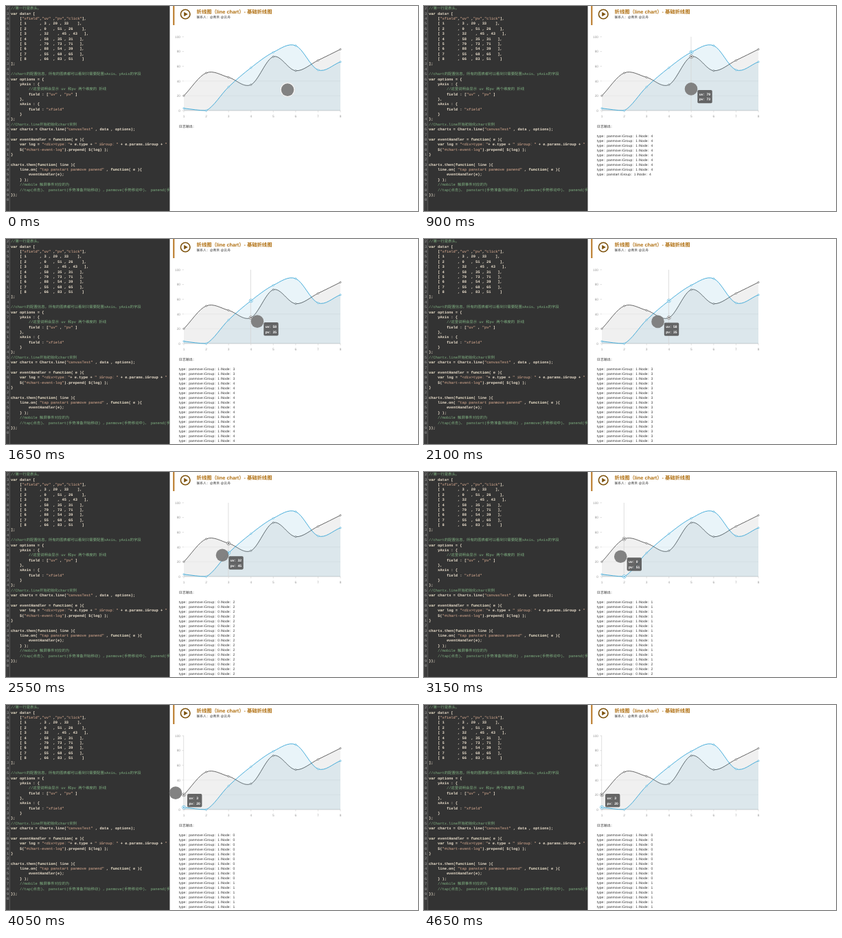
These frames come from a looping animation (600x300 px, 5930 ms). An HTML page:

```html
<!DOCTYPE html>
<html lang="zh">
<head>
<meta charset="utf-8">
<title>折线图</title>
<style>
html, body { margin: 0; width: 100%; height: 100%; overflow: hidden; background: #fff; }
svg { display: block; width: 600px; height: 300px; }
text { font: 5px "Liberation Sans", "Noto Sans CJK SC", "Noto Sans CJK", sans-serif; fill: #333; text-rendering: geometricPrecision; }
.code text { font: bold 5.4px "Liberation Mono", "Noto Sans CJK SC", "Noto Sans CJK", monospace; fill: #efe3d0; }
.code .comment { fill: #80b383; font-weight: normal; }
.code .string { fill: #e6b598; font-weight: normal; }
.code .keyword { fill: #fbf0d6; }
.code .lineno { fill: #aaa; font-weight: normal; }
.title { font-size: 7.3px; font-weight: bold; fill: #b06f10; }
.axis text { font-size: 4.8px; fill: #999; }
.tip text { font-weight: bold; fill: #fff; }
</style>
</head>
<body>
<svg viewBox="0 0 600 300">
  <defs><clipPath id="pane"><rect width="238.5" height="300"/></clipPath></defs>
  <g class="code" clip-path="url(#pane)">
    <rect width="239" height="300" fill="#333"/>
    <rect width="5.5" height="300" fill="#3d3d3d"/>
    <path d="M5.5 0V300" stroke="#666" stroke-width=".7"/>
    <g id="code"></g>
  </g>
  <rect x="243.3" width="2" height="28" fill="#b5731f"/>
  <circle cx="261.2" cy="12" r="6.8" fill="none" stroke="#7d520c" stroke-width="1.6"/>
  <path d="M259.2 8.8L264.8 12L259.2 15.2Z" fill="#7d520c"/>
  <text class="title" x="277.6" y="10.7">折线图（line chart）- 基础折线图</text>
  <text x="277.5" y="18.4" style="font-size:4.8px">联系人：@青禾 @云舟</text>
  <g class="axis" id="axis"></g>
  <g id="chart"></g>
  <text x="251.8" y="177.7">日志输出：</text>
  <g id="log"></g>
  <g id="hover">
    <path id="cross" stroke="#d6d6d6" stroke-width=".8"/>
    <g id="marks"></g>
    <g class="tip" id="tip">
      <rect width="21.4" height="19.4" rx="1.8" fill="#505050" fill-opacity=".87"/>
      <text id="uv" x="2.4" y="8"></text>
      <text id="pv" x="2.4" y="15.6"></text>
    </g>
  </g>
  <g id="cursor">
    <circle id="ring" r="10.6" fill="#fff" stroke="#ddd" stroke-width=".6"/>
    <circle r="9.3" fill="#7b7b7b" fill-opacity=".95"/>
  </g>
</svg>
<script>
const $ = id => document.getElementById(id);

function add(parent, tag, attrs, content) {
  const el = document.createElementNS('http://www.w3.org/2000/svg', tag);
  for (const name in attrs) el.setAttribute(name, attrs[name]);
  if (content !== undefined) el.textContent = content;
  return parent.appendChild(el);
}

// ---- code pane ----
const source = String.raw`//第一行是表头。
var data= [
    ["xfield","uv" ,"pv","click"],
    [ 1      , 3 , 20 , 33    ],
    [ 2      , 0   , 51 , 26    ],
    [ 3      , 32    , 45 , 43   ],
    [ 4      , 58  , 35 , 31   ],
    [ 5      , 79  , 73 , 71   ],
    [ 6      , 88  , 54 , 39   ],
    [ 7      , 55  , 68 , 65   ],
    [ 8      , 66  , 83 , 51    ]
];

//chart的配置信息，所有的图表都可以看到只需要配置xAxis、yAxis的字段
var options = {
    yAxis : {
        //这里说明会显示 uv 和pv 两个维度的 折线
        field : ["uv" , "pv" ]
    },
    xAxis : {
        field : "xfield"
    }
};
//Chartx.line开始初始化chart实例
var chartx = Chartx.line("canvasTest" , data , options);

var eventHandler = function( e ){
    var log = "<div>type："+ e.type + " iGroup：" + e.params.iGroup + " iNode：" + e.params.iNode;
    $("#chart-event-log").prepend( $(log) );
}

chartx.then(function( line ){
    line.on( "tap panstart panmove panend" , function( e ){
        eventHandler(e);
    } );
    //mobile 触屏事件对应的为
    //tap(点击)、 panstart(手势准备开始移动) ，panmove(手势移动中)、 panend(手势结束)
});
`;
const token = /(\/\/.*)|("[^"]*")|(\b(?:var|function)\b)|([^"\/]+?(?=\/\/|"|\bvar\b|\bfunction\b|$))/g;
source.split('\n').forEach((line, i) => {
  const y = 5.4 + i * 7.365;
  add($('code'), 'text', { class: 'lineno', x: 1, y }, (i + 2) % 10);
  const row = add($('code'), 'text', { x: 7, y });
  for (const [word, comment, string, keyword] of line.matchAll(token)) {
    const kind = comment ? 'comment' : string ? 'string' : keyword ? 'keyword' : 'plain';
    add(row, 'tspan', { class: kind }, word.replace(/ /g, '\u00a0'));
  }
});

// ---- chart, fed by the data rows of the code ----
const data = source.match(/\[ \d.*\]/g).map(row => row.match(/\d+/g).map(Number));
const last = data.length - 1;
const left = 259, right = 487, base = 153;
const step = (right - left) / last;
const px = i => left + i * step;
const py = v => base - v * 1.08;
const series = [
  { name: 'pv', values: data.map(row => row[2]), line: '#555', area: 'rgba(0,0,0,.06)' },
  { name: 'uv', values: data.map(row => row[1]), line: '#36a5d6', area: 'rgba(40,150,195,.1)' }
];

function smoothPath(values) {
  const ys = values.map(py);
  const clampBase = y => Math.min(base, y);
  const slope = i => {
    const a = Math.max(0, i - 1), b = Math.min(last, i + 1);
    return (ys[b] - ys[a]) / (b - a) / 3;
  };
  let d = `M${left} ${ys[0]}`;
  for (let i = 0; i < last; i++) {
    d += `C${px(i + 1 / 3)} ${clampBase(ys[i] + slope(i))} ` +
      `${px(i + 2 / 3)} ${clampBase(ys[i + 1] - slope(i + 1))} ${px(i + 1)} ${ys[i + 1]}`;
  }
  return d;
}

for (let v = 0; v <= 100; v += 20) {
  add($('axis'), 'text', { x: 254, y: py(v) + 1.7, 'text-anchor': 'end' }, v);
  add($('axis'), 'path', { d: `M256.5 ${py(v)}h2.5`, stroke: '#ccc', 'stroke-width': .6 });
  if (v < 60) add($('axis'), 'path', { d: `M${left} ${py(v)}H${right}`, stroke: '#eee', 'stroke-width': .6 });
}
add($('axis'), 'path', { d: `M${left} ${base}H${right}`, stroke: '#ccc', 'stroke-width': .7 });
data.forEach(([label], i) => {
  add($('axis'), 'path', { d: `M${px(i)} ${base}v2.5`, stroke: '#ccc', 'stroke-width': .6 });
  add($('axis'), 'text', { x: px(i), y: 162.6, 'text-anchor': 'middle' }, label);
});

const marks = series.map(({ values, line, area }) => {
  const d = smoothPath(values);
  add($('chart'), 'path', { d: `${d}V${base}H${left}Z`, fill: area });
  add($('chart'), 'path', { d, fill: 'none', stroke: line, 'stroke-width': .9 });
  values.forEach((v, i) => add($('chart'), 'circle',
    { cx: px(i), cy: py(v), r: 1.1, fill: '#fff', stroke: line, 'stroke-width': .6 }));
  const mark = add($('marks'), 'g', {});
  add(mark, 'circle', { r: 2.5, fill: '#fff', stroke: line, 'stroke-width': .6 });
  add(mark, 'circle', { r: 1.1, fill: line });
  return mark;
});

// ---- drag across the chart: time, x ----
const dragStart = 450, dragEnd = 4050, release = 4500, gone = 4650, loop = 5930;
const path = [[dragStart, 410], [900, 389], [1650, 366], [2550, 315], [2870, 302.4], [3450, 269], [dragEnd, 247]];

function cursorX(t) {
  const time = Math.min(dragEnd, Math.max(dragStart, t));
  const i = path.findIndex(([end]) => end >= time) || 1;
  const [t0, x0] = path[i - 1], [t1, x1] = path[i];
  return x0 + (x1 - x0) * (time - t0) / (t1 - t0);
}

function cursorY(t) {
  const p = Math.min(1, Math.max(0, (t - dragStart) / (dragEnd - dragStart)));
  return 122.6 - 12 * p + 18 * p * p;
}

// ---- pan events arrive at a steady rate while the finger is on the chart ----
const firstEvent = 720, lastEvent = 3655, interval = 22;
const eventCount = t => t < firstEvent ? 0 : Math.floor((Math.min(t, lastEvent) - firstEvent) / interval) + 1;
const nodeOf = k => Math.max(0, Math.round((cursorX(firstEvent + k * interval) + 5.3 - left) / step));

function logLine(k) {
  if (k < 0) return '';
  const node = nodeOf(k);
  return `type：${k ? 'panmove' : 'panstart'} iGroup：${node === 2 ? 0 : 1} iNode：${node}`;
}

const rows = Array.from({ length: 16 }, (_, i) =>
  add($('log'), 'text', { x: 251.8, y: 192.4 + i * 6.98 }));

// The picture advances in 150 ms steps with a rest before the release.
function stepTime(t) {
  if (t < dragStart) return 0;
  const stepped = Math.floor(t / 150) * 150;
  return stepped < release ? Math.min(dragEnd, stepped) : Math.min(gone, stepped);
}

const move = (el, x, y) => el.setAttribute('transform', `translate(${x} ${y})`);
const show = (el, on) => { el.style.display = on ? '' : 'none'; };

function render(t) {
  const x = cursorX(t), y = cursorY(t);
  show($('cursor'), t < gone);
  show($('ring'), t === 0);
  if (t < release) move($('cursor'), x, y);
  else move($('cursor'), 228, 212);

  const count = eventCount(t);
  rows.forEach((row, i) => { row.textContent = logLine(count - 1 - i); });

  show($('hover'), count > 0);
  if (!count) return;
  const node = nodeOf(count - 1);
  $('cross').setAttribute('d', `M${px(node) - .3} 45V${base}`);
  series.forEach(({ name, values }, i) => {
    move(marks[i], px(node), py(values[node]));
    $(name).textContent = `${name}：${values[node]}`;
  });
  move($('tip'), Math.max(left + 5, x + 9.3), y + 1.5);
}

const start = performance.now();
let shown = -1;
function tick() {
  const t = stepTime((performance.now() - start) % loop);
  if (t !== shown) render(shown = t);
  requestAnimationFrame(tick);
}
tick();
</script>
</body>
</html>
```
